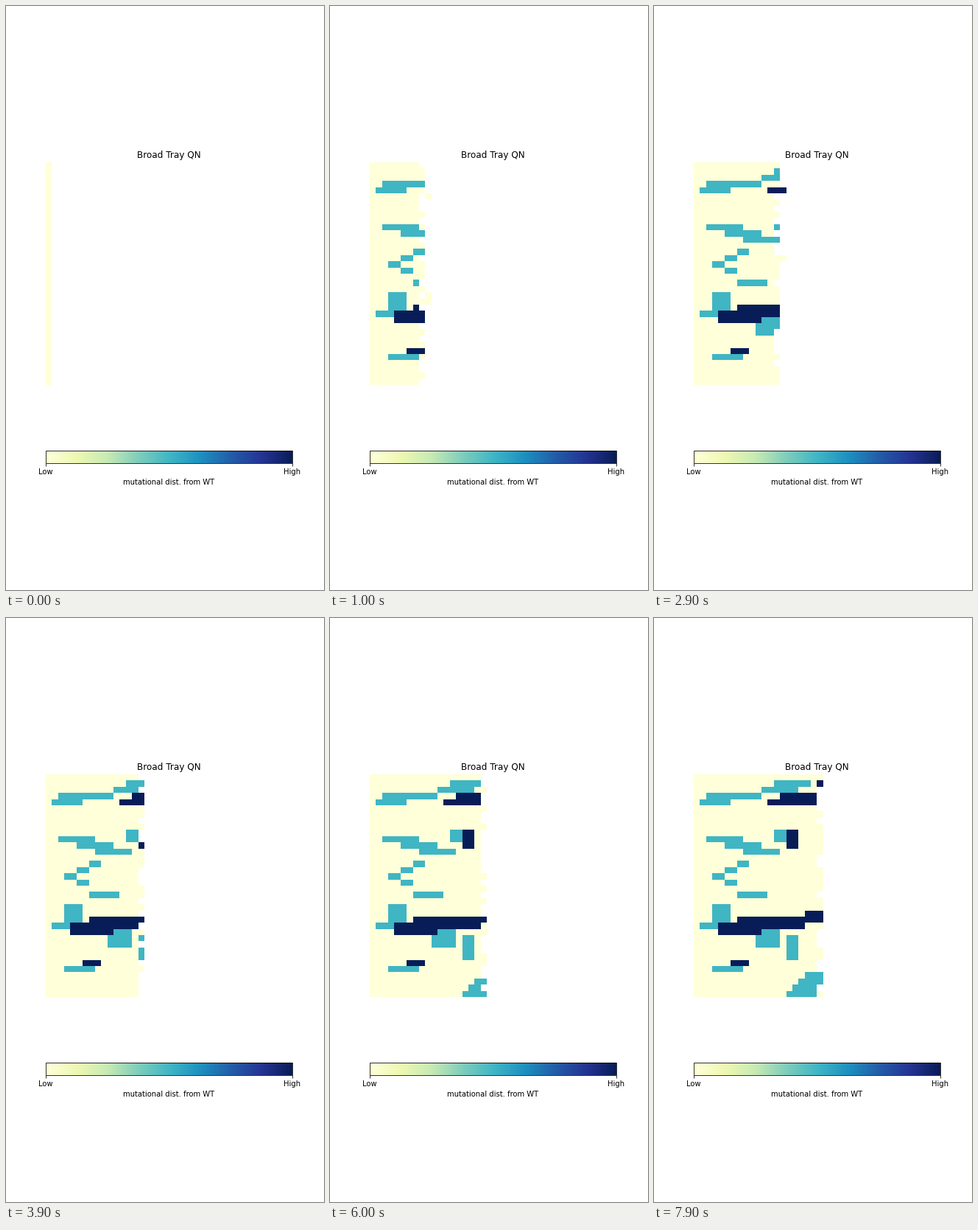
Write a matplotlib script that moves like this. It is 432 by 792 pixels and loops after 8000 ms.

```python
import numpy as np
import matplotlib.pyplot as plt
from matplotlib.animation import FuncAnimation

W, H, DPI = 432, 792, 72
ROWS, COLS, FRAMES = 36, 40, 80
CELL = 8.37
LEFT, TOP = 54, 212.4
MID, HIGH = 0.5, 1.0
SPEED, POWER = 3.45, 0.41

rng = np.random.default_rng(7)


def birth_times():
    """The front moves as SPEED * t**POWER, at most one column per frame."""
    col = np.arange(COLS)
    reach = col + 0.5 + rng.uniform(-0.9, 0.9, (ROWS, COLS))
    birth = np.maximum(col, (np.maximum(reach, 0) / SPEED) ** (1 / POWER))
    birth[:, 0] = 0
    return birth


def mutation_levels():
    level = np.zeros((ROWS, COLS))

    def clone(value, row, col, length, height=1, lean=0):
        """A streak of mutants; each further row is shifted by lean."""
        for k in range(height):
            start = col + k * lean
            level[row + k, start:start + length] = value

    clone(MID, 1, 13, 6, 2, lean=-2)
    clone(MID, 3, 2, 9)
    clone(MID, 4, 1, 5)
    clone(MID, 9, 13, 2, 2)
    clone(MID, 10, 2, 6, 3, lean=3)
    clone(MID, 19, 7, 5)
    clone(MID, 21, 3, 3, 3)
    clone(MID, 24, 1, 3)
    clone(MID, 25, 10, 4, 3)
    clone(MID, 26, 15, 2, 4)
    clone(MID, 31, 3, 5)
    clone(MID, 32, 18, 5, 4, lean=-1)

    clone(HIGH, 1, 20, 2, 2)
    clone(HIGH, 3, 14, 8, 2, lean=-2)
    clone(HIGH, 9, 15, 2, 3)
    clone(HIGH, 22, 18, 3)
    clone(HIGH, 23, 7, 14, 2, lean=-3)
    clone(HIGH, 25, 4, 7)
    clone(HIGH, 30, 6, 3)

    # Short mutants in the quiet rows between the streaks.
    for row in range(14, 18):
        clone(MID, row, rng.integers(1, 16), 2)
    return level


BIRTH = birth_times()
LEVEL = mutation_levels()


def plate(t):
    return np.ma.masked_where(BIRTH > t, LEVEL)


def add_axes(x, y, w, h):
    return fig.add_axes([x / W, 1 - (y + h) / H, w / W, h / H])


fig = plt.figure(figsize=(W / DPI, H / DPI), dpi=DPI, facecolor="white")
ax = add_axes(LEFT, TOP, COLS * CELL, ROWS * CELL)
ax.axis("off")
ax.set_title("Broad Tray QN", fontsize=12)
image = ax.imshow(plate(0), cmap="YlGnBu", vmin=0, vmax=1,
                  aspect="auto", interpolation="nearest")

bar = fig.colorbar(image, cax=add_axes(LEFT, 603.4, COLS * CELL, 16.74),
                   orientation="horizontal", ticks=[0, 1])
bar.ax.set_xticklabels(["Low", "High"])
bar.set_label("mutational dist. from WT")


def update(t):
    image.set_data(plate(t))
    return [image]


anim = FuncAnimation(fig, update, frames=FRAMES, interval=100, repeat=True)
plt.show()
```
